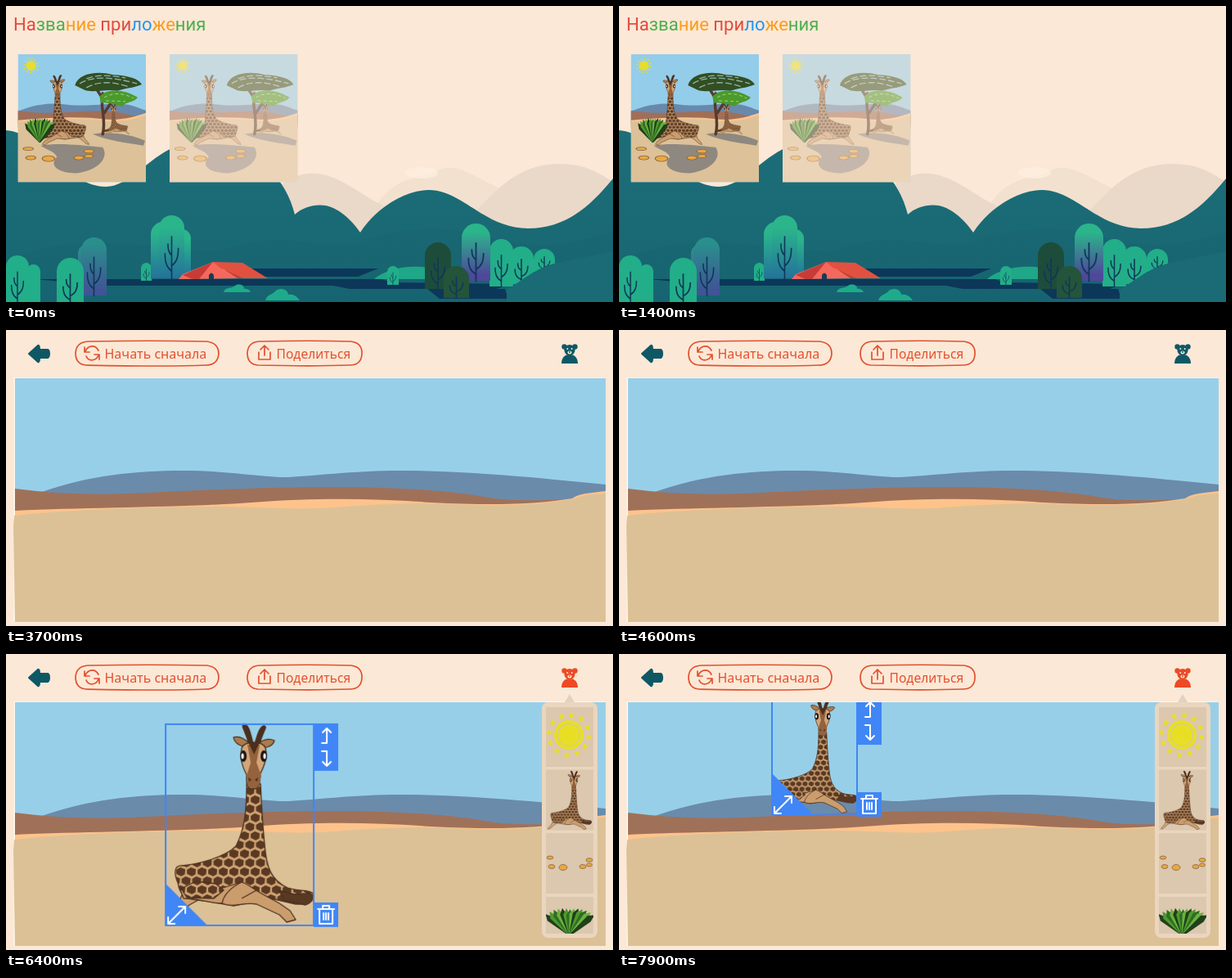
An HTML page that plays this animation: 742 px wide and 362 px high, repeating every 8 s.

```html
<!DOCTYPE html>
<html lang="ru">
<head>
<meta charset="utf-8">
<title>Название приложения</title>
<style>
html, body { margin: 0; width: 742px; height: 362px; overflow: hidden; background: #fce8d6; }
svg { display: block; }
.layer { position: absolute; left: 0; top: 0; width: 742px; height: 362px; }
.defs { position: absolute; width: 0; height: 0; }
.title { font: 22.1px Roboto, sans-serif; }
.button { font: 500 16px "Noto Sans", sans-serif; fill: #e2502f; }
.line { fill: none; stroke: #e2502f; stroke-width: 1.7; stroke-linecap: round; stroke-linejoin: round; }
.icon { fill: none; stroke: #fff; stroke-width: 2; stroke-linecap: round; stroke-linejoin: round; }

.editor { overflow: hidden; background: #fce8d6;
  animation: fade 8s infinite, rise 8s infinite; }
.canvas { position: absolute; left: 11px; top: 59px; width: 722px; height: 298px; overflow: hidden; }
.item { position: absolute; right: 442px; top: -6px; width: 182px; height: 247px;
  animation: add 8s step-end infinite, drag 8s infinite, resize 8s infinite; }
.item > svg { position: absolute; }
.select { position: absolute; inset: 0; animation: pick 8s step-end infinite; }
.select::before { content: ""; position: absolute; inset: 0 -1px -1px 0; border: 2px solid #4086f6; }
.select svg { position: absolute; background: #4086f6; }
.select .grip { left: 0; bottom: -1px; background: none; }
.select .order { left: 100%; top: 0; }
.select .bin { left: 100%; bottom: -2px; }
.panel { animation: open 8s infinite; }
.bear { fill: currentColor; animation: tint 8s infinite; }

@keyframes fade {
  0%, 34.2% { opacity: 0; animation-timing-function: ease-in; }
  37.95%, 100% { opacity: 1; }
}
@keyframes rise {
  0%, 34.2% { transform: translateY(90px); animation-timing-function: cubic-bezier(.4, 0, .2, 1); }
  37.95%, 100% { transform: none; }
}
@keyframes open { 0%, 57.6% { opacity: 0; } 61.2%, 100% { opacity: 1; } }
@keyframes tint { 0%, 57.6% { color: #0e5866; } 59%, 100% { color: #ed4a25; } }
@keyframes add { 0% { visibility: hidden; } 68.75%, 100% { visibility: visible; } }
@keyframes pick { 0% { opacity: 0; } 75%, 100% { opacity: 1; } }
@keyframes drag {
  0%, 75% { transform: translate(171px, 64px); animation-timing-function: ease-in-out; }
  85%, 100% { transform: none; }
}
@keyframes resize {
  0%, 92.5% { width: 182px; height: 247px; animation-timing-function: ease-in-out; }
  98.7%, 100% { width: 105.5px; height: 144px; }
}
</style>
</head>
<body>
<svg class="defs">
  <defs>
    <pattern id="spots" width="13" height="22" patternUnits="userSpaceOnUse">
      <path fill="#cfa272" d="M0 0H13V22H0Z"/>
      <g fill="#5a3923">
        <path id="spot" d="M1 3L6 0 12 2.5 11.5 8.5 7 11 1 8Z"/>
        <use href="#spot" x="-6.5" y="11"/><use href="#spot" x="6.5" y="11"/>
      </g>
    </pattern>
    <linearGradient id="land" x2="0" y2="1"><stop stop-color="#1d6e78"/><stop offset="1" stop-color="#176772"/></linearGradient>
    <linearGradient id="violet" x2="0" y2="1"><stop offset=".1" stop-color="#2a8f8c"/><stop offset=".9" stop-color="#3f5596"/></linearGradient>
    <linearGradient id="mint" x2="0" y2="1"><stop offset=".2" stop-color="#2bb58b"/><stop offset="1" stop-color="#24729a"/></linearGradient>
    <linearGradient id="plum" x2="0" y2="1"><stop offset=".15" stop-color="#2bb58b"/><stop offset=".9" stop-color="#4f479b"/></linearGradient>

    <symbol id="giraffe" viewBox="0 0 182 247" preserveAspectRatio="none">
      <g stroke="#4b301e" stroke-width="1.3" stroke-linejoin="round">
        <path fill="#d0a374" d="M24 203L16 221 4 235 2 241 12 238 30 222 48 212Z"/>
        <path fill="url(#spots)" d="M100 74C100 110 97 130 87 150C74 164 40 172 21 174C11 173 11 184 16 195C18 212 28 216 50 217L84 223 130 214 160 221C176 222 184 215 181 208C177 203 166 206 150 201C130 192 124 176 122 148C119 120 118 96 117 74Z"/>
        <path fill="#cb9d6d" d="M38 196C52 198 60 196 68 202L94 194C102 197 108 202 118 208L140 220 153 229 160 240 149 243 140 234 112 221C96 218 84 226 70 220C55 220 40 214 23 214L19 204Z"/>
        <path fill="url(#spots)" d="M20 202L38 193 62 196 72 204 60 214 27 213Z"/>
        <path fill="#5a3923" d="M139 204L158 209 172 208C183 206 185 217 172 222L147 217Z"/>
        <path fill="none" d="M70 220C72 209 82 200 94 194M94 214L112 204"/>
        <path fill="#ad7a4c" d="M104 25C97 18 90 15 84 17C85 25 94 29 103 29ZM113 25C120 20 128 18 134 21C132 28 123 31 114 30Z"/>
        <path fill="#4b2e1c" d="M96 1C93 4 98 8 103 26L108 25C105 14 103 0 96 1ZM122 3C126 5 119 10 116 26L110 25C113 14 117 1 122 3Z"/>
        <path fill="#d2a678" d="M94 30C98 21 119 21 123 30C126 42 121 53 116 63C117 76 114 80 108 80C101 80 99 75 100 63C95 54 91 42 94 30Z"/>
        <path fill="#94623c" stroke="none" d="M101 26H116L112 48 118 64C116 76 114 79 108 79C102 79 100 75 100 64L105 48Z"/>
        <path fill="#4b2e1c" stroke="none" d="M102 23H116L109 38ZM102 66l4 3-3 2ZM114 66l-4 3 3 2Z"/>
      </g>
      <g fill="#1c1410"><ellipse cx="96" cy="40" rx="4" ry="7"/><ellipse cx="121" cy="40" rx="4" ry="7"/></g>
      <g fill="#fff"><ellipse cx="95" cy="40" rx="1.6" ry="3.6"/><ellipse cx="122" cy="40" rx="1.6" ry="3.6"/></g>
    </symbol>

    <g id="sun">
      <circle r="18" fill="#e8df25"/>
      <circle r="13.5" fill="none" stroke="#d8cd85" stroke-width="1.6"/>
      <circle r="24.5" fill="none" stroke="#e8df25" stroke-width="5" stroke-dasharray="5 7.83"/>
    </g>
    <g id="bush"></g>
    <g id="stones" fill="#e9a743" stroke="#8b6840" stroke-width=".8">
      <ellipse cx="5" cy="3" rx="4" ry="2"/><ellipse cx="7" cy="14" rx="4" ry="2.5"/><ellipse cx="21" cy="15" rx="5" ry="3.5"/>
      <ellipse cx="45" cy="14" rx="4" ry="2.5"/><ellipse cx="53" cy="6" rx="4" ry="2.3"/><ellipse cx="53" cy="12" rx="3.5" ry="2"/>
    </g>

    <symbol id="scene" viewBox="0 0 157 157">
      <path fill="#94cde9" d="M0 0H157V157H0Z"/>
      <path fill="#6889ac" d="M0 70C20 62 35 60 52 61C80 65 100 61 118 61C138 60 148 66 157 69V85H0Z"/>
      <path fill="#a06f58" d="M0 69C40 77 80 66 120 71C135 73 145 78 157 74V90H0Z"/>
      <path fill="#fbc48f" d="M0 81C40 77 80 76 110 80C130 81 145 76 157 72V92H0Z"/>
      <path fill="#dcc199" d="M0 83C40 79 80 78 110 82C130 83 145 79 157 75V157H0Z"/>
      <path fill="#8f8880" d="M28 112C50 108 80 112 104 114C112 126 100 142 72 146C48 146 38 136 48 126C44 118 36 118 28 112ZM92 98C115 94 140 99 156 106L154 112C130 108 110 106 92 98Z"/>
      <use href="#sun" transform="translate(16 14) scale(.34)"/>
      <g fill="none" stroke="#573a2b" stroke-width="4" stroke-linecap="round">
        <path d="M104 98C109 80 100 64 104 48M106 72C114 60 116 55 126 48M105 56L96 42" stroke-width="3.5"/>
      </g>
      <path fill="#334e22" d="M70 38C74 24 96 20 116 25C136 26 148 30 152 37C140 42 132 41 122 45C108 42 92 48 82 44Z"/>
      <g fill="none" stroke="#8db3ab" stroke-width="1.3" stroke-dasharray="8 3">
        <path d="M76 36C92 26 116 28 146 36M84 41C100 32 118 34 136 40M84 30C100 24 116 26 132 29"/>
      </g>
      <path fill="#4c9a2c" d="M100 52C108 42 130 42 147 53C142 60 132 58 128 64C118 62 108 58 102 60Z"/>
      <path fill="none" stroke="#a5d184" stroke-dasharray="4 3" d="M106 53C118 46 130 48 142 54M108 57L132 58"/>
      <use href="#giraffe" transform="translate(137 61) scale(-1 1)" width="33" height="38"/>
      <use href="#giraffe" transform="translate(88 25) scale(-1 1)" width="66" height="88"/>
      <use href="#bush" transform="translate(9.5 70) scale(.62 .9)"/>
      <use href="#stones" transform="translate(5 113) scale(1.55 1)"/>
    </symbol>

    <symbol id="twigs" viewBox="0 0 24 44" preserveAspectRatio="none">
      <path fill="none" stroke="#0f3858" stroke-width="1.8" d="M12 44V3M12 36C4 32 3 26 3 19M12 31C20 27 21 21 21 14M12 21C7 18 7 14 7 10"/>
    </symbol>
  </defs>
</svg>

<svg class="layer" viewBox="0 0 742 362">
  <path fill="#fce8d6" d="M0 0H742V362H0Z"/>
  <path fill="#f3e1cf" d="M455 240C480 205 510 212 530 200C555 190 580 215 620 230V290H440Z"/>
  <g fill="#ead9c8">
    <path d="M330 225C350 202 380 200 405 212C430 224 445 238 470 248V290H330Z"/>
    <path d="M575 250C600 225 625 194 675 193C710 193 725 205 742 215V290H575Z"/>
  </g>
  <ellipse cx="508" cy="204" rx="20" ry="7" fill="#fff0e0" opacity=".7"/>
  <path fill="url(#land)" d="M0 152C45 155 75 221 122 221C150 221 175 185 205 173C290 160 340 200 353 255C365 244 385 240 400 247C415 254 427 268 433 277C450 250 485 225 517 225C558 225 585 272 638 272C685 272 715 244 742 211V362H0Z"/>
  <path fill="#125b68" opacity=".18" d="M0 312C90 270 180 300 260 300C340 270 380 300 430 290C480 270 540 265 600 285C660 300 700 290 742 275V362H0Z"/>
  <path fill="#0c3759" d="M300 321H455L430 331H300ZM36 334H460L470 338 615 340 600 346H420L400 342H120ZM515 346H610L614 358H530Z"/>
  <path fill="#1fa787" d="M450 334C464 322 490 316 516 320V334Z"/>
  <g id="trees"></g>
  <path fill="#1a6b75" d="M612 362V347C630 337 645 321 674 314L742 300V362Z"/>
  <path fill="#e2513f" d="M253 313L289 314 320 333H270Z"/>
  <path fill="#f4685d" d="M211 334L216 328 253 313 284 333Z"/>
  <path fill="#c83c37" d="M216 329L253 313 236 334H228ZM253 313L262 320 290 333H283Z"/>
  <path fill="#173b55" d="M248 334V329Q251 324 254 329V334Z"/>
  <path fill="#1dab8b" d="M266 350C268 343 276 346 280 342C287 338 292 343 291 346C297 345 299 350 299 350ZM317 360C319 352 327 353 330 348C339 343 345 349 345 353C354 351 359 360 359 360Z"/>
  <use href="#scene" x="14.5" y="59" width="156.5" height="156.5"/>
  <use href="#scene" x="200" y="59" width="156.5" height="156.5"/>
  <path fill="#fce8d6" opacity=".5" d="M200 59H356.5V215.5H200Z"/>
  <text class="title" x="9" y="30" xml:space="preserve"><tspan fill="#e2493f">На</tspan><tspan fill="#4caf50">зва</tspan><tspan fill="#fb9d1c">ние</tspan><tspan fill="#e2493f"> при</tspan><tspan fill="#2196f3">ло</tspan><tspan fill="#fb9d1c">же</tspan><tspan fill="#4caf50">ния</tspan></text>
</svg>

<div class="layer editor">
  <svg class="layer" viewBox="0 0 742 362">
    <path fill="#fff7ec" d="M9.5 58H733V357H9.5Z"/>
    <path fill="#98cfe8" d="M11 59H733V300H11Z"/>
    <path fill="#6b8bab" d="M44 198C100 178 160 172 215 172C275 172 310 180 345 180C380 178 430 172 480 172C570 172 660 182 733 189V230H44Z"/>
    <path fill="#a07159" d="M11 194Q80 203 150 200C250 195 330 192 400 192C480 192 550 197 590 205C620 210 660 208 692 207V225H11Z"/>
    <path fill="#fdc38b" d="M11 221C100 217 220 217 300 211C380 205 450 206 520 211C600 215 650 213 692 206C700 200 715 199 733 197V235H11Z"/>
    <path fill="#dcc197" d="M10 227C60 221 150 217 240 216C300 215 360 221 400 217C440 214 480 212 520 212C600 216 650 215 695 206C705 202 715 201 733 200V357H11L9 240Z"/>
    <path fill="#0e5866" stroke="#0e5866" stroke-width="2" stroke-linejoin="round" d="M28 29L39 19Q41 18 41 24H51Q53 25 53 29Q53 33 51 34H41Q41 40 39 39Z"/>
    <g class="line">
      <path d="M100 14C150 13 200 13 246 14Q260 16 260 29Q259 43 244 43C200 45 150 44 98 43Q85 42 85 28Q86 15 100 14Z"/>
      <path d="M309 14C350 13 390 13 422 14Q436 16 435 30Q434 43 420 43C390 44 350 44 308 43Q295 42 295 28Q296 15 309 14Z"/>
      <path d="M96 21V27H102M97 26C100 19 109 17 113 25M114 36V30H108M113 31C110 38 101 39 98 32"/>
      <path d="M309 27V36H323V27M316 31V19M311 24L316 19 321 24"/>
    </g>
    <text class="button" x="120.5" y="34.5">Начать сначала</text>
    <text class="button" x="330.5" y="34.5" style="font-size:15.6px">Поделиться</text>
    <g class="bear">
      <circle cx="682.5" cy="20.5" r="3.2"/><circle cx="695.5" cy="20.5" r="3.2"/><circle cx="689" cy="24.5" r="6.6"/>
      <path d="M679 41C679 33 684 30 689 30S699 33 699 41Z"/>
      <g fill="#fce8d6"><ellipse cx="689" cy="27.5" rx="2.5" ry="2"/><circle cx="686.3" cy="23" r="1"/><circle cx="691.7" cy="23" r="1"/></g>
      <circle cx="689" cy="27" r="1"/>
    </g>
  </svg>

  <div class="canvas">
    <div class="item">
      <svg width="100%" height="100%"><use href="#giraffe" width="100%" height="100%"/></svg>
      <div class="select">
        <svg class="grip" width="53" height="53"><path fill="#4086f6" d="M0 0V53H53Z"/><path class="icon" d="M4 50L25 29M4 42V50H12M17 29H25V37"/></svg>
        <svg class="order" width="30" height="58"><path class="icon" d="M10 24H16V7M11 11L16 6 21 11M10 34H16V52M11 47L16 52 21 47"/></svg>
        <svg class="bin" width="30" height="30"><path class="icon" d="M5 8H25M11 8V4H19V8M7 8V26H23V8M12 13V21M15 13V21M18 13V21"/></svg>
      </div>
    </div>
  </div>

  <svg class="layer panel" viewBox="0 0 742 362">
    <path fill="#e0d2c4" d="M683 59L689 49 695 59Z"/>
    <rect x="655" y="59" width="68" height="288" rx="8" fill="#ead6be"/>
    <path fill="#dcc7af" d="M660 65H718V138H660ZM660 141.5H718V215.5H660ZM660 219H718V293H660ZM660 297H718V342H660Z"/>
    <use href="#sun" x="688" y="99"/>
    <use href="#giraffe" x="662" y="142.5" width="54" height="73.5"/>
    <use href="#stones" x="660" y="246"/>
    <svg x="660" y="297" width="58" height="45"><use href="#bush" x="1" y="5"/></svg>
  </svg>
</div>

<script>
const put = (id, html) => { document.getElementById(id).innerHTML = html; };

// Leaves fan out from one root
const greens = ['#21401b', '#4f9a2f', '#2f6d22', '#6bb23e'];
let leaves = '';
for (let i = 0; i < 13; i++) {
  const turn = -50 + i * 8.3;
  const len = 32 + Math.abs(i - 6) * 1.2;
  leaves += `<path fill="${greens[i % 4]}" transform="translate(28 42) rotate(${turn})" d="M-1 0L-4 ${-len + 7} 1 ${-len} 4 ${-len + 9} 1 0Z"/>`;
}
put('bush', leaves);

const green = '#22ae88';
const tree = ([x, y, w, h, fill, twigs = 1]) =>
  `<path fill="${fill}" d="M${x} ${y + h}V${y + w / 2}a${w / 2} ${w / 2} 0 0 1 ${w} 0V${y + h}Z"/>` +
  (twigs ? `<use href="#twigs" x="${x + w * .15}" y="${y + h * .28}" width="${w * .7}" height="${h * .74}"/>` : '');
put('trees', [
  [25, 316, 17, 46, green, 0], [0, 305, 28, 60, green],
  [88, 291, 24, 63, 'url(#violet)', 0], [92, 283, 31, 71, 'url(#violet)'], [62, 308, 33, 58, green],
  [165, 314, 13, 22, green],
  [204, 273, 22, 60, 'url(#mint)', 0], [177, 264, 30, 69, 'url(#mint)', 0], [187, 256, 31, 77, 'url(#mint)'],
  [466, 318, 14, 23, green],
  [645, 297, 26, 28, green], [615, 294, 30, 46, green], [591, 285, 29, 58, green],
  [557, 266, 35, 70, 'url(#plum)'], [512, 289, 32, 57, '#1d4d3a'], [535, 318, 31, 39, '#24543a'],
].map(tree).join(''));
</script>
</body>
</html>
```
